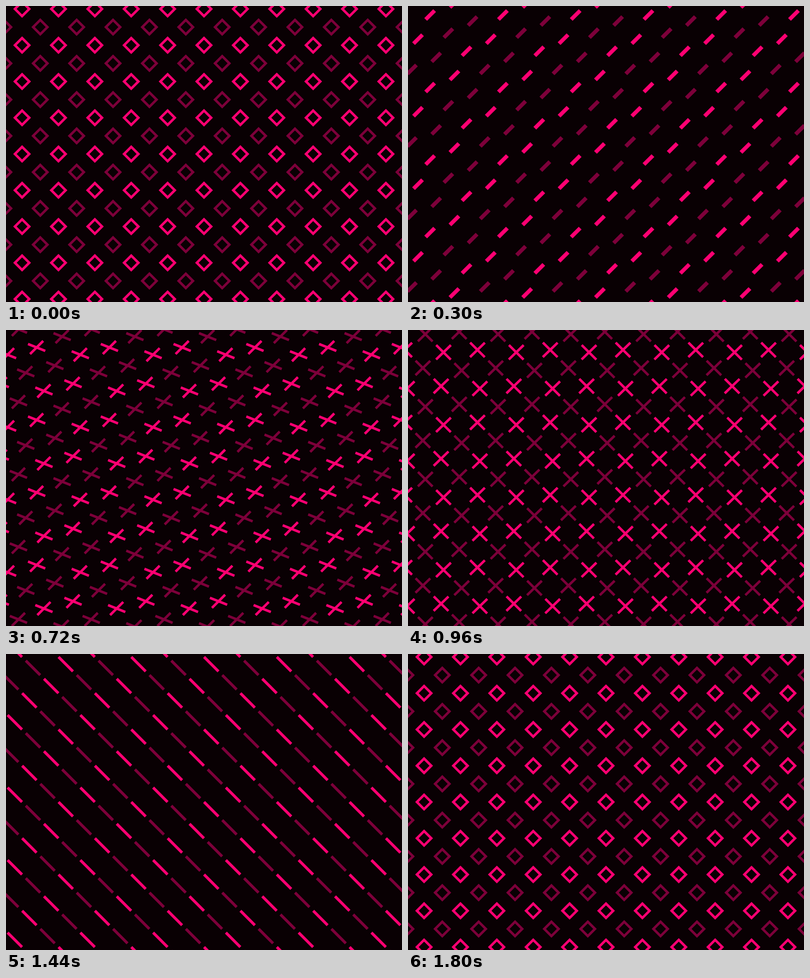
These frames come from a looping animation (800x600 px, 1.83 s). An HTML page with a canvas:

```html
<!DOCTYPE html>
<html lang="en">
<head>
<meta charset="utf-8">
<title>Diamonds and crosses</title>
<style>
  html, body { margin: 0; width: 100%; height: 100%; overflow: hidden; background: #090003; }
  canvas { display: block; }
</style>
</head>
<body>
<canvas id="stage" width="800" height="600"></canvas>
<script>
const ctx = document.getElementById('stage').getContext('2d');
const GAP = 73.5, STROKE = 5, SHORT = 25.5, LONG = 41.75;
const STEP_MS = 30, STEPS = 60, PHASE = 15;

const mix = (a, b, p) => a + (b - a) * p;
const ease = p => p < 0.5 ? 4 * p ** 3 : 1 - 4 * (1 - p) ** 3;

// Rectangular ring with outer size l by w; solid once the hole closes.
function ring(l, w) {
  const path = new Path2D();
  path.rect(-l / 2, -w / 2, l, w);
  const hole = w - 2 * STROKE;
  if (hole > 0) path.rect(STROKE - l / 2, -hole / 2, l - 2 * STROKE, hole);
  return path;
}

function turned(path, degrees) {
  const result = new Path2D();
  result.addPath(path, new DOMMatrix().rotate(degrees));
  return result;
}

// Square closes to a bar, one stick turns, the other follows, the bar opens.
function shapesAt(step) {
  const phase = Math.floor(step / PHASE);
  const p = ease(step % PHASE / PHASE);
  if (phase === 0) return [turned(ring(SHORT, mix(SHORT, STROKE, p)), -45)];
  if (phase === 3) return [turned(ring(mix(LONG, SHORT, p), mix(STROKE, SHORT, p)), 45)];
  const stick = ring(phase === 1 ? mix(SHORT, LONG, p) : LONG, STROKE);
  const angle = mix(-45, 45, p);
  return [turned(stick, phase === 1 ? -45 : 45), turned(stick, angle)];
}

function drawGrid(shapes, color, offset, shift) {
  ctx.fillStyle = color;
  for (let j = -7; j <= 7; j++) {
    for (let i = -8; i <= 8; i++) {
      const move = offset + ((i + j) % 2 ? shift : -shift);
      ctx.setTransform(1, 0, 0, 1, 400 + i * GAP + move, 300 + j * GAP + move);
      for (const shape of shapes) ctx.fill(shape, 'evenodd');
    }
  }
  ctx.resetTransform();
}

const start = performance.now();

function draw() {
  const time = Math.max(0, performance.now() - start) % (STEP_MS * (STEPS + 1));
  const step = Math.floor(time / STEP_MS) % STEPS;
  const shapes = shapesAt(step);
  const shift = GAP * step / STEPS;
  ctx.fillStyle = '#090003';
  ctx.fillRect(0, 0, 800, 600);
  drawGrid(shapes, '#7d003a', GAP / 2, shift);
  drawGrid(shapes, '#ff0072', 0, shift);
  requestAnimationFrame(draw);
}
draw();
</script>
</body>
</html>
```
